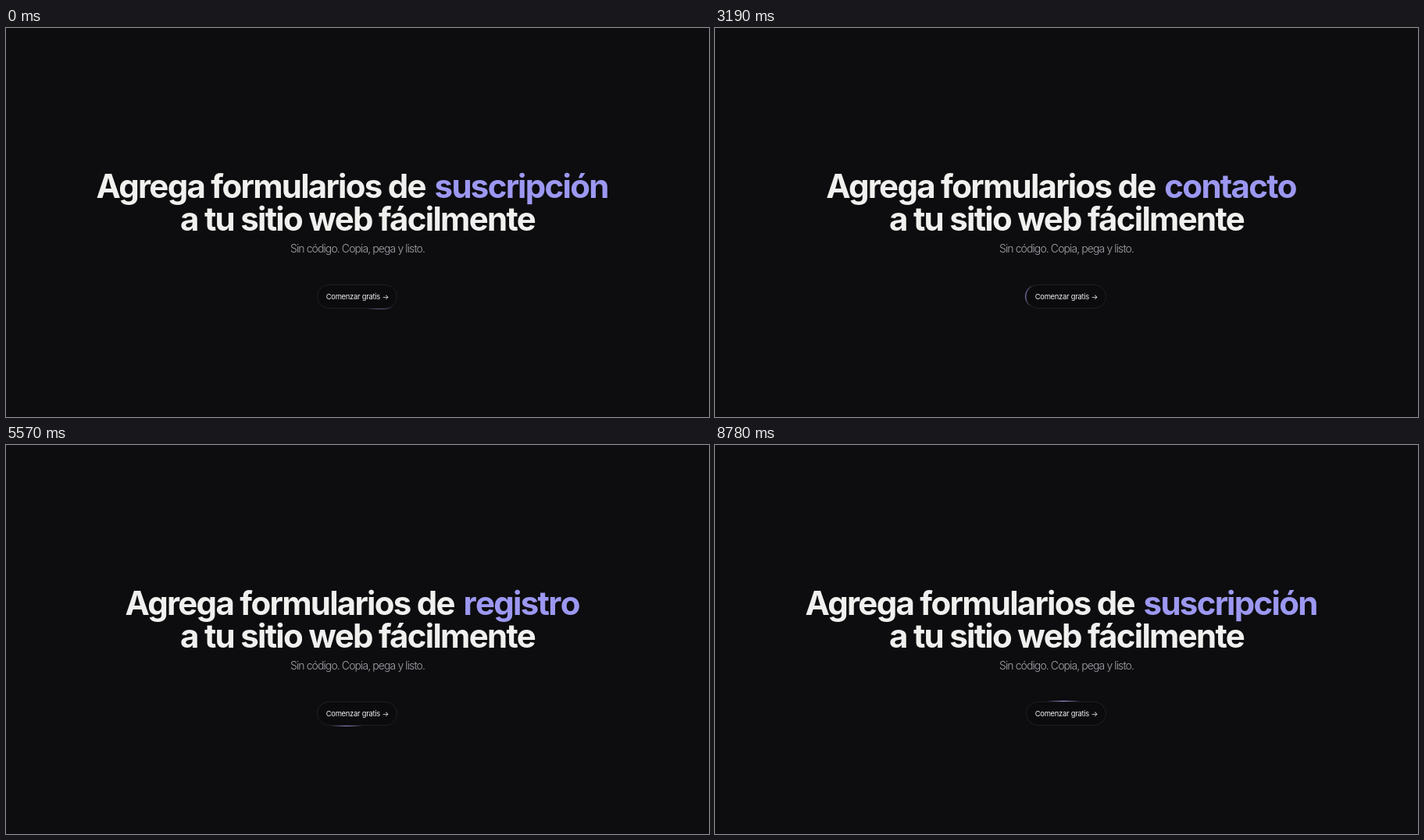
Recreate the animation shown at these times as an HTML page. Size 900x499 px, loop 8.84 s.

```html
<!DOCTYPE html>
<html lang="es">
<head>
<meta charset="utf-8">
<title>Formularios</title>
<style>
  html, body { margin: 0; width: 100%; height: 100%; overflow: hidden; background: #0d0d0f; }
  body { position: relative; font-family: Inter, "Open Sans", sans-serif; font-optical-sizing: none; }
  h1, p { position: absolute; left: 0; width: 900px; margin: 0; text-align: center; white-space: nowrap; }
  h1 { top: 181.5px; font-size: 42px; line-height: 42px; font-weight: 700; letter-spacing: -.041em; color: #f0f0ef; }
  p { top: 272.5px; font-size: 14px; line-height: 20px; font-weight: 300; letter-spacing: -.9px; color: #a4a4ac; }
  #slot { display: inline-block; position: relative; color: #9c98f1; }
  .word { display: inline-block; padding: 0 5.6px 0 3.5px; }
  .word span { display: inline-block; }
  #leaving { position: absolute; left: 0; top: 0; }
  #button { position: absolute; left: 397.3px; top: 328.2px; width: 105.2px; height: 32.6px; border-radius: 17px; overflow: hidden; }
  #glow { position: absolute; inset: 0; filter: blur(.6px); }
  #label { position: absolute; inset: 1.2px; box-sizing: border-box; border: 1px solid #1f1f23; border-radius: 16px;
    background: #0b0b0d; color: #f0f0f2; font-size: 9.4px; line-height: 29px; letter-spacing: -.25px; text-align: center; white-space: nowrap; }
</style>
</head>
<body>
<h1>Agrega formularios de <span id="slot"><span id="entering" class="word"></span><span id="leaving" class="word"></span></span><br>a tu sitio web fácilmente</h1>
<p>Sin código. Copia, pega y listo.</p>
<div id="button"><div id="glow"></div><div id="label">Comenzar gratis →</div></div>
<script>
const LOOP = 8840, SPEED = 1.5, SCALE = .7;
const WORDS = ["suscripción", "contacto", "registro"];
const FLIPS = [2145, 4884, 7617];
const QUARTER = 331.5, START_PHASE = 1.45;
// Glow ellipse at top, right, bottom, left: radii and centre in percent
const SPOTS = [[20.7, 50, 50, 0], [16.2, 41.2, 100, 50], [20.7, 50, 50, 100], [16.6, 43.1, 0, 50]];

const [entering, leaving, glow] = ["entering", "leaving", "glow"].map(id => document.getElementById(id));

const smooth = x => {
  x = Math.min(1, Math.max(0, x));
  return x * x * (3 - 2 * x);
};
// Spring with stiffness 100, damping 10
const spring = s => {
  const w = Math.sqrt(75) * s;
  return 1 - Math.exp(-5 * s) * (Math.cos(w) + Math.sin(w) / Math.sqrt(3));
};
const blur = px => px > .01 ? `blur(${px * SCALE}px)` : "none";

function setWord(el, word) {
  if (el.dataset.word === word) return;
  el.dataset.word = word;
  el.replaceChildren(...[...word, "\u00a0"].map(c => {
    const span = document.createElement("span");
    span.textContent = c;
    return span;
  }));
}

function drawWords(t) {
  const flips = FLIPS.filter(f => f <= t).length;
  const since = (t - (flips ? FLIPS[flips - 1] : FLIPS[2] - LOOP)) / 1000 * SPEED;
  const p = spring(since), shown = smooth(since / .3);

  setWord(entering, WORDS[flips % 3]);
  entering.style.opacity = Math.max(0, p) * shown;
  entering.style.filter = blur(8 * (1 - shown));
  entering.style.transform = `translateY(${10 * SCALE * (2 - p - shown)}px)`;
  [...entering.children].forEach((letter, i) => {
    const k = smooth((since - i * .05) / .2);
    letter.style.opacity = k;
    letter.style.filter = blur(8 * (1 - k));
    letter.style.transform = `translateY(${10 * SCALE * (1 - k)}px)`;
  });

  setWord(leaving, WORDS[(flips + 2) % 3]);
  leaving.style.visibility = since < .35 ? "visible" : "hidden";
  leaving.style.opacity = Math.max(0, 1 - p);
  leaving.style.filter = blur(8 * p);
  leaving.style.transform = `translate(${40 * SCALE * p}px, ${-40 * SCALE * p}px) scale(${1 + p})`;
}

function drawGlow(t) {
  const phase = START_PHASE + t / QUARTER, i = Math.floor(phase), k = phase - i;
  const next = SPOTS[(i + 1) % 4];
  const [rx, ry, x, y] = SPOTS[i % 4].map((v, n) => v + (next[n] - v) * k + "%");
  glow.style.background = `radial-gradient(${rx} ${ry} at ${x} ${y}, #a19ceb, rgba(161, 156, 235, 0))`;
}

const began = performance.now();
function frame() {
  const t = (performance.now() - began) % LOOP;
  drawWords(t);
  drawGlow(t);
  requestAnimationFrame(frame);
}
frame();
</script>
</body>
</html>
```
